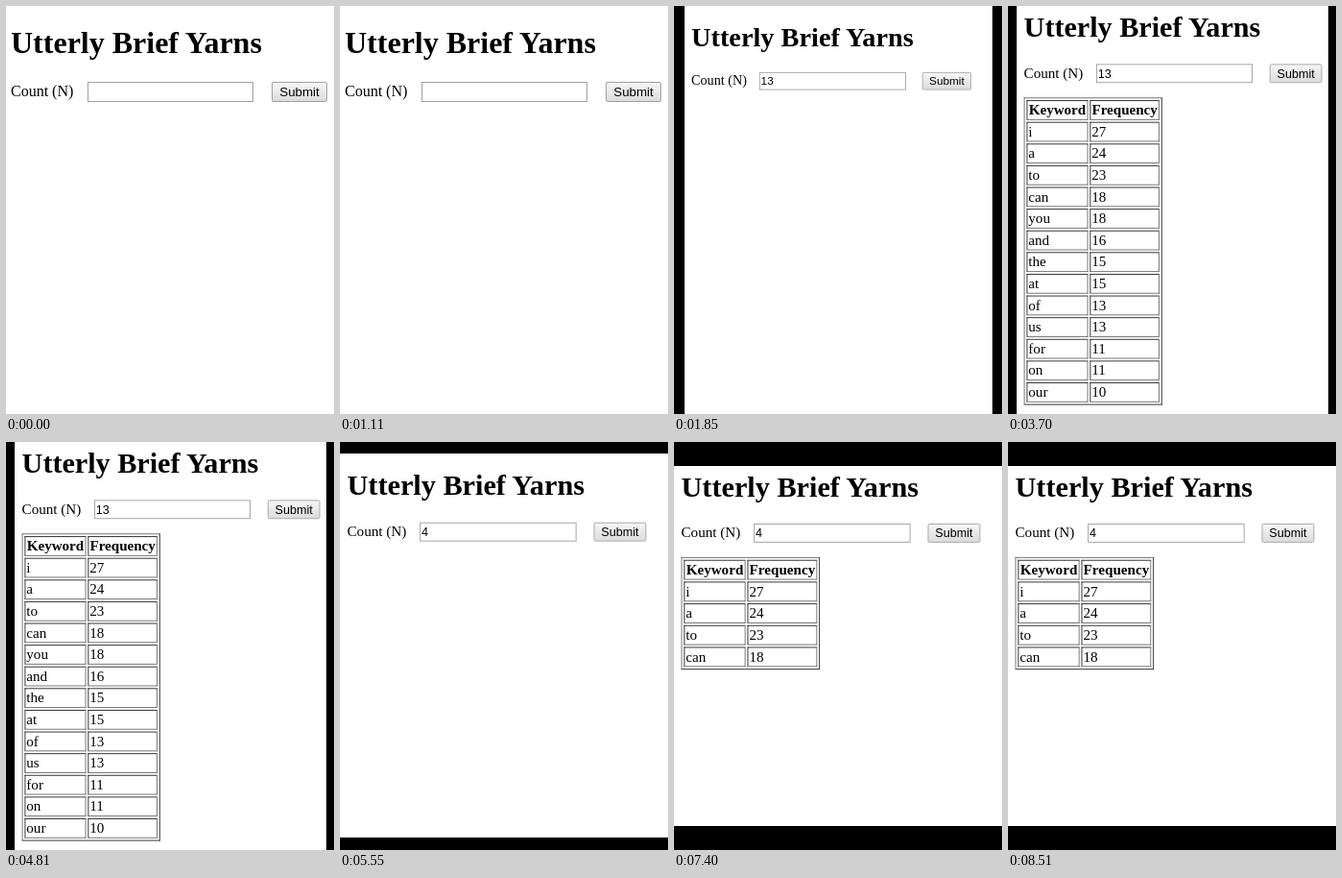
An HTML page for the animation above (9.25 s loop, 342x425 px).

```html
<!DOCTYPE html>
<html lang="en">
<head>
<meta charset="utf-8">
<title>Keyword counter</title>
<style>
  html, body { margin: 0; width: 100%; height: 100%; overflow: hidden; background: #000; }
  #paper { position: absolute; background: #fff; }
  #page { position: absolute; left: 0; top: 0; width: 342px; height: 425px; transform-origin: 0 0;
    font: 16px/18px "Liberation Serif", "Times New Roman", serif; color: #000; }
  #page > * { position: absolute; margin: 0; box-sizing: border-box; white-space: nowrap; }
  h1 { left: 5px; top: 20px; font-size: 32px; line-height: 36px; }
  #label { left: 5px; top: 80px; }
  #field, #button { top: 79px; height: 21px; border: 1px solid #a0a0a0;
    font: 13.333px/19px "Liberation Sans", Arial, sans-serif; }
  #field { left: 85px; width: 173px; padding-left: 1px; }
  #button { left: 277px; width: 58px; text-align: center; border-radius: 2px;
    background: linear-gradient(#f6f6f6, #dcdcdc); }
  table { left: 5px; top: 116px; width: 153px; border: 1px solid;
    border-color: #707070 #2c2c2c #2c2c2c #707070; border-spacing: 2px; }
  th, td { padding: 1px; border: 1px solid; border-color: #2c2c2c #707070 #707070 #2c2c2c; }
  th:first-child { width: 64px; }
</style>
</head>
<body>
<div id="paper"></div>
<div id="page">
  <h1>Utterly Brief Yarns</h1>
  <div id="label">Count (N)</div>
  <div id="field"></div>
  <div id="button">Submit</div>
  <table></table>
</div>
<script>
const STEP = 1850;
const words = 'i 27,a 24,to 23,can 18,you 18,and 16,the 15,at 15,of 13,us 13,for 11,on 11,our 10'
  .split(',').map(w => w.split(' '));

// paper: left, top, right, bottom; view: scale, x, y
const scenes = [
  { paper: [0, 0, 342, 425], view: [1, 0, 0], value: '', rows: 0 },
  { paper: [11, 0, 332, 425], view: [.885, 13.6, -1], value: '13', rows: 0 },
  { paper: [9, 0, 334, 425], view: [.942, 11.9, -14], value: '13', rows: 13 },
  { paper: [0, 12, 342, 412], view: [.945, 2.8, 9.1], value: '4', rows: 0 },
  { paper: [0, 25, 342, 400], view: [.945, 2.8, 10.3], value: '4', rows: 4 }
];

const $ = s => document.querySelector(s);
const row = (cells, tag) => '<tr>' + cells.map(c => `<${tag}>${c}</${tag}>`).join('') + '</tr>';
let shown = -1;

function show({ paper: [l, t, r, b], view: [scale, x, y], value, rows }) {
  Object.assign($('#paper').style,
    { left: l + 'px', top: t + 'px', width: r - l + 'px', height: b - t + 'px' });
  $('#page').style.transform = `translate(${x}px, ${y}px) scale(${scale})`;
  $('#field').textContent = value;
  $('table').hidden = !rows;
  $('table').innerHTML = row(['Keyword', 'Frequency'], 'th') +
    words.slice(0, rows).map(w => row(w, 'td')).join('');
}

function tick() {
  const i = Math.floor(performance.now() / STEP) % scenes.length;
  if (i !== shown) show(scenes[shown = i]);
  requestAnimationFrame(tick);
}
tick();
</script>
</body>
</html>
```
